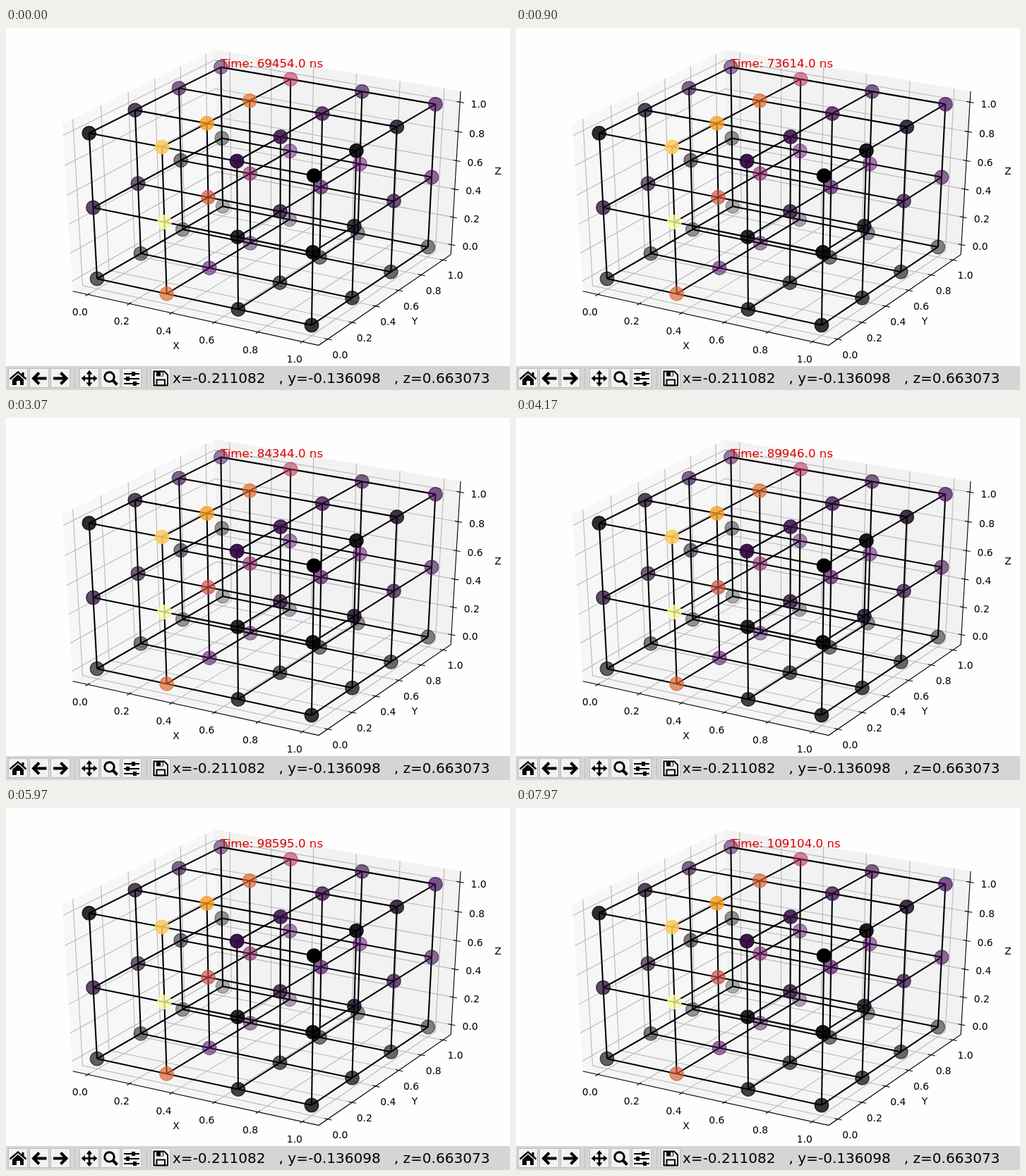
An HTML page with a canvas that plays this animation: 714x514 px, repeating every 8 s.

```html
<!DOCTYPE html>
<html>
<head>
<meta charset="utf-8">
<style>
html, body { margin: 0; width: 100%; height: 100%; overflow: hidden; background: #fefefe; }
canvas { display: block; }
</style>
</head>
<body>
<canvas id="stage" width="714" height="514"></canvas>
<script>
const ctx = document.getElementById('stage').getContext('2d');
const LOOP = 8000, STEPS = 240;
const LO = -0.073, HI = 1.073;
const FONT = '"DejaVu Sans", sans-serif';
const THIRDS = [0, 1 / 3, 2 / 3, 1], HALVES = [0, 0.5, 1];

// Key points of the counter: [step, nanoseconds]
const READINGS = [[0, 69454], [27, 73614], [60, 78912], [125, 89946],
  [159, 95263], [200, 102093], [239, 109104]];
const HEAT = [[0, 0, 4], [87, 16, 110], [188, 55, 84], [249, 140, 10], [252, 255, 164]];

// Perspective camera: azimuth -60 degrees, elevation 30 degrees, distance 10
const AZIMUTH = -Math.PI / 3, ELEVATION = Math.PI / 6, DISTANCE = 10;
const [ca, sa, ce, se] = [Math.cos(AZIMUTH), Math.sin(AZIMUTH), Math.cos(ELEVATION), Math.sin(ELEVATION)];
const centered = p => p.map(v => (v - 0.5) / 1.1);

function depth(...p) {
  const [x, y, z] = centered(p);
  return DISTANCE - (ce * ca * x + ce * sa * y + se * z);
}

function project(...p) {
  const [x, y, z] = centered(p), w = depth(...p);
  const right = -sa * x + ca * y;
  const up = -se * ca * x - se * sa * y + ce * z;
  return [366.7 + 3860 * right / w, 233.1 - 2599 * up / w];
}

// The column at x = 1/3 is hot; its neighbours only glow in the upper layers.
function intensity(x, y, z) {
  const middle = 4 * z * (1 - z), top = z * (2 * z - 1);
  const smooth = y * y * (3 - 2 * y);
  const column = Math.round(x * 3);
  if (column === 0) return 0.18 * smooth * top + 0.09 * (1 - y) * middle;
  if (column === 2) return 0.14 * top + 0.27 * smooth * middle;
  if (column === 3) return 0.19 * y ** 4 * top + 0.16 * smooth * middle;
  const front = 0.64 + 1.19 * z - 0.94 * z * z, back = 0.1 * 5 ** z;
  return front + (back - front) * y ** (0.27 * 4.5 ** z);
}

function heat(v) {
  const s = Math.min(v, 0.9999) * (HEAT.length - 1), i = Math.floor(s);
  return `rgb(${HEAT[i].map((c, k) => Math.round(c + (HEAT[i + 1][k] - c) * (s - i)))})`;
}

function path(...points) {
  ctx.beginPath();
  for (const p of points) ctx.lineTo(...p);
}

function line(...points) {
  path(...points);
  ctx.stroke();
}

const line3d = (...points) => line(...points.map(p => project(...p)));

function disc(x, y, r) {
  ctx.beginPath();
  ctx.arc(x, y, r, 0, 7);
  ctx.fill();
}

function pane(color, ...points) {
  path(...points.map(p => project(...p)));
  ctx.fillStyle = color;
  ctx.fill();
}

function label(text, [x, y], dx = 0, dy = 0) {
  ctx.fillText(text, x + dx, y + dy + 5);
}

function drawAxes() {
  pane('#f7f7f7', [LO, LO, LO], [LO, HI, LO], [LO, HI, HI], [LO, LO, HI]);
  pane('#f2f2f2', [LO, HI, LO], [HI, HI, LO], [HI, HI, HI], [LO, HI, HI]);
  pane('#f5f5f5', [LO, LO, LO], [HI, LO, LO], [HI, HI, LO], [LO, HI, LO]);

  const ticks = Array.from({ length: 6 }, (_, i) => i / 5);
  ctx.lineWidth = 1.1;
  ctx.strokeStyle = '#b8b8b8';
  for (const t of ticks) {
    line3d([t, LO, LO], [t, HI, LO], [t, HI, HI]);
    line3d([HI, t, LO], [LO, t, LO], [LO, t, HI]);
    line3d([LO, LO, t], [LO, HI, t], [HI, HI, t]);
  }

  ctx.strokeStyle = ctx.fillStyle = '#000';
  line3d([LO, LO, LO], [HI, LO, LO], [HI, HI, LO], [HI, HI, HI]);
  ctx.font = '13.89px ' + FONT;
  ctx.textAlign = 'center';
  const inner = 0.015, outer = 0.018;
  for (const t of ticks) {
    line3d([t, LO - outer, LO], [t, LO + inner, LO]);
    line3d([HI - inner, t, LO], [HI + outer, t, LO]);
    line3d([HI - inner, HI, t], [HI + outer, HI, t]);
    const text = t.toFixed(1);
    label(text, project(t, LO, LO), -11, 25);
    label(text, project(HI, t, LO), 17.5, 22);
    label(text, project(HI, HI, t), 26.5, 2.5);
  }
  label('X', [241, 451]);
  label('Y', [579, 416]);
  label('Z', [697, 203]);
}

function drawLattice(progress) {
  ctx.lineWidth = 2.08;
  ctx.strokeStyle = '#000';
  const nodes = [];
  for (const a of THIRDS) {
    for (const z of HALVES) {
      line3d([0, a, z], [1, a, z]);
      line3d([a, 0, z], [a, 1, z]);
    }
    for (const b of THIRDS) {
      line3d([a, b, 0], [a, b, 1]);
      for (const z of HALVES) nodes.push([a, b, z]);
    }
  }

  // Far nodes first, fading with distance
  nodes.sort((p, q) => depth(...q) - depth(...p));
  const near = depth(1, 0, 1), far = depth(0, 1, 0);
  ctx.lineWidth = 1.39;
  for (const p of nodes) {
    const v = intensity(...p);
    const cooling = v > 0.2 && v < 0.7 ? 0.03 * progress : 0;
    ctx.globalAlpha = 1 - 0.7 * (depth(...p) - near) / (far - near);
    ctx.fillStyle = ctx.strokeStyle = heat(v - cooling);
    disc(...project(...p), 9.8);
    ctx.stroke();
  }
  ctx.globalAlpha = 1;
}

function turned(x, y, angle, paint) {
  ctx.save();
  ctx.translate(x, y);
  ctx.rotate(angle);
  paint();
  ctx.restore();
}

function longArrow() {
  ctx.lineWidth = 4;
  line([-10, 0], [6.5, 0]);
  line([0.5, -8], [8.5, 0], [0.5, 8]);
}

function panArrow() {
  ctx.lineWidth = 2.8;
  line([0, 0], [8, 0]);
  path([11.5, 0], [6, -4.5], [6, 4.5]);
  ctx.fill();
}

function drawToolbar() {
  ctx.fillStyle = '#d5d5d5';
  ctx.fillRect(0, 480, 714, 34);
  ctx.lineWidth = 1;
  for (const x of [4, 34, 64, 105, 135, 165, 206]) {
    ctx.fillStyle = '#f2f2f0';
    ctx.strokeStyle = '#bdbdbd';
    ctx.fillRect(x - 0.5, 483.5, 27, 27);
    ctx.strokeRect(x - 0.5, 483.5, 27, 27);
  }
  ctx.strokeStyle = '#aaa';
  ctx.setLineDash([1, 1]);
  for (const x of [97.5, 199.5]) line([x, 484], [x, 511]);
  ctx.setLineDash([]);
  ctx.strokeStyle = ctx.fillStyle = '#000';

  // Home
  ctx.lineWidth = 2.4;
  line([5.5, 498.5], [17, 488.5], [28.5, 498.5]);
  path([9, 499], [17, 492], [25, 499], [25, 507], [9, 507]);
  ctx.fill();
  ctx.fillRect(22.5, 489, 3, 6);
  ctx.clearRect(14.5, 501, 5, 6);

  // Back, forward and pan
  turned(47.5, 497.5, Math.PI, longArrow);
  turned(77, 497.5, 0, longArrow);
  for (let i = 0; i < 4; i++) turned(118, 497.5, i * Math.PI / 2, panArrow);

  // Zoom
  ctx.lineWidth = 3;
  ctx.beginPath();
  ctx.arc(146.5, 495.5, 6.8, 0, 7);
  ctx.stroke();
  ctx.lineWidth = 4;
  line([151.5, 500.5], [157.5, 506.5]);

  // Sliders
  for (const [y, knob] of [[491, 180], [498, 172], [505, 182]]) {
    ctx.fillRect(167, y - 1, 22, 2);
    ctx.fillRect(knob - 2, y - 3, 5, 6);
  }

  // Save
  ctx.lineWidth = 2;
  path([209.5, 487.5], [224, 487.5], [229, 492.5], [229, 507.5], [209.5, 507.5]);
  ctx.closePath();
  ctx.stroke();
  ctx.strokeRect(213.5, 499.5, 11.5, 8);
  ctx.fillRect(213, 488, 10, 6.5);
  ctx.clearRect(218.5, 489, 3, 4.5);

  ctx.font = '20.04px ' + FONT;
  ctx.textAlign = 'left';
  ctx.fillText('x=-0.211082   , y=-0.136098   , z=0.663073', 236, 504);
}

function reading(step) {
  const i = Math.max(1, READINGS.findIndex(r => r[0] >= step));
  const [s0, n0] = READINGS[i - 1], [s1, n1] = READINGS[i];
  return Math.round(n0 + (n1 - n0) * (step - s0) / (s1 - s0));
}

function draw(ms) {
  // 30 updates per second, on a 10 ms grid
  const step = Math.floor((Math.floor(ms / 10) * 3 + 1) / 10);
  ctx.fillStyle = '#fefefe';
  ctx.fillRect(0, 0, 714, 514);
  drawAxes();
  drawLattice(step / (STEPS - 1));
  ctx.font = '16.67px ' + FONT;
  ctx.textAlign = 'left';
  ctx.fillStyle = '#e00000';
  ctx.fillText(`Time: ${reading(step)}.0 ns`, 304, 56);
  drawToolbar();
}

const start = performance.now();
function tick() {
  draw((performance.now() - start) % LOOP);
  requestAnimationFrame(tick);
}
tick();
</script>
</body>
</html>
```
